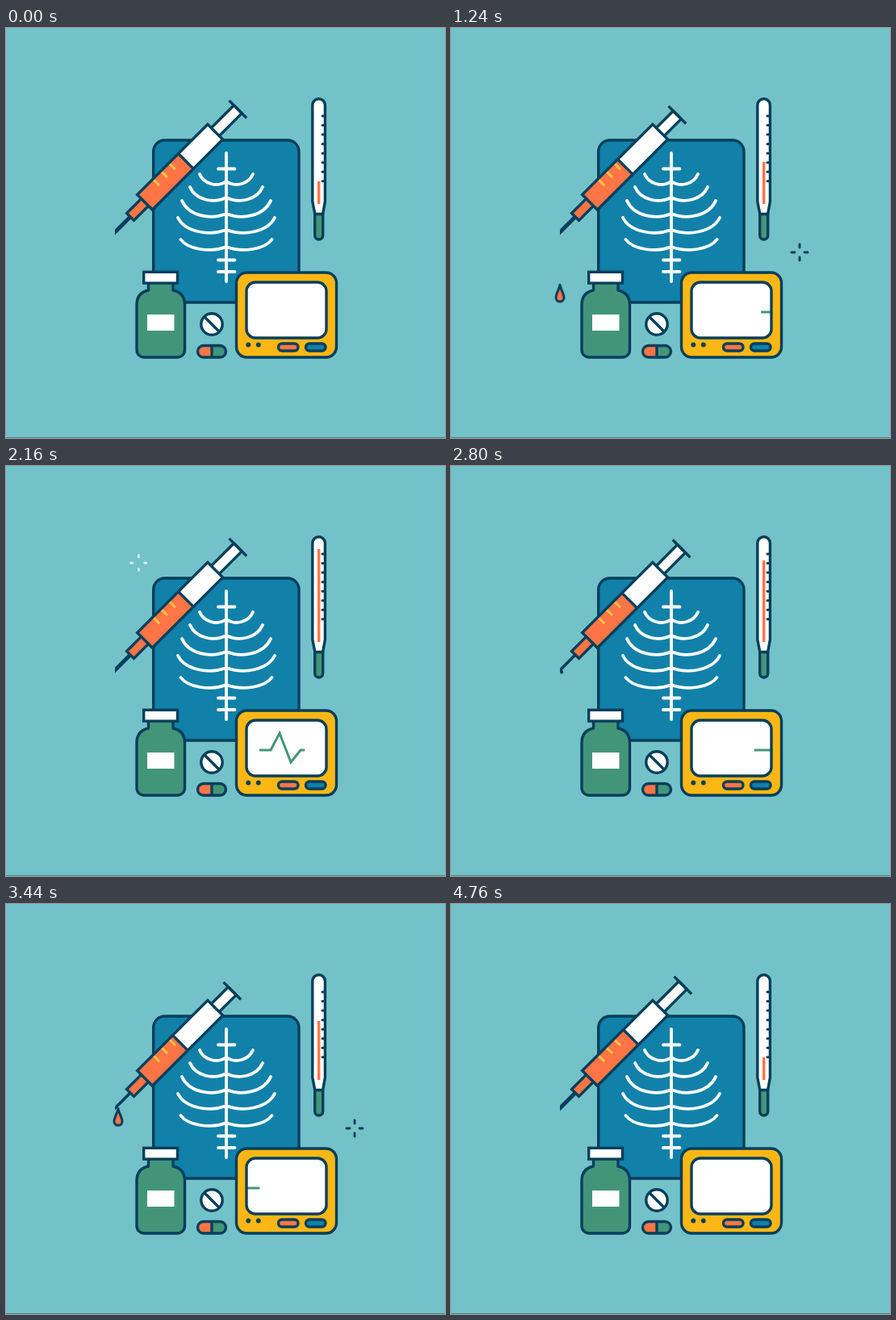
Write an HTML page that moves like this. It is 544 px wide and 508 px high and loops after 4800 ms.

```html
<!DOCTYPE html>
<html lang="en">
<head>
<meta charset="utf-8">
<title>Medical kit</title>
<style>
  html, body { margin: 0; width: 100%; height: 100%; overflow: hidden; background: #73c2c9; }
  svg { display: block; width: 100vw; height: 100vh; }
  .ink { stroke: #063f5b; stroke-width: 3.4; stroke-linejoin: round; }
  .line { fill: none; stroke-linecap: round; }
</style>
</head>
<body>
<svg viewBox="0 0 544 508">
  <defs>
    <clipPath id="screenClip"><rect x="298" y="315" width="99" height="69" rx="11"/></clipPath>
    <clipPath id="tipClip"><rect x="135" y="220" width="40" height="40"/></clipPath>
  </defs>
  <rect width="544" height="508" fill="#73c2c9"/>
  <rect y="507" width="544" height="1" fill="#4f8086"/>

  <!-- x-ray -->
  <rect class="ink" x="182.7" y="139" width="180.3" height="201" rx="14" fill="#1181a9"/>
  <path id="ribs" class="line" stroke="#fff" stroke-width="3.8"/>

  <!-- thermometer -->
  <path class="ink" fill="#43957a" d="M382.7 230H392.7V257a5 5 0 0 1-10 0Z"/>
  <path class="ink" fill="#fff" d="M379.8 95.5a7.8 7.8 0 0 1 15.6 0V215L392.6 230.5H382.8L379.8 215Z"/>
  <path id="ticks" class="line" stroke="#063f5b" stroke-width="3"/>
  <path id="mercury" stroke="#ff7545" stroke-width="3.4"/>

  <!-- bottle -->
  <path class="ink" fill="#43957a" d="M176.5 315H207V325Q221.5 328 221.5 343V399a9 9 0 0 1-9 9H171a9 9 0 0 1-9-9V343Q162 328 176.5 325Z"/>
  <rect class="ink" x="170.7" y="302.3" width="41.8" height="13.8" fill="#fff" style="stroke-linejoin:miter"/>
  <rect x="175" y="355" width="33.5" height="20" fill="#fff"/>

  <!-- pills -->
  <circle class="ink" cx="255" cy="367" r="13.2" fill="#fff"/>
  <path class="ink" d="M246 358L264 376"/>
  <rect x="237.5" y="393.5" width="35" height="14.5" rx="7.2" fill="#43957a"/>
  <path fill="#ff7545" d="M255 393.5H244.7a7.2 7.2 0 0 0 0 14.5H255Z"/>
  <path class="ink" d="M255 393.5V408"/>
  <rect class="ink" x="237.5" y="393.5" width="35" height="14.5" rx="7.2" fill="none"/>

  <!-- monitor -->
  <rect class="ink" x="285.5" y="303" width="124" height="105" rx="13" fill="#fdb714"/>
  <rect x="298" y="315" width="99" height="69" rx="11" fill="#fff"/>
  <g clip-path="url(#screenClip)">
    <path id="pulse" fill="none" stroke="#43957a" stroke-width="3" d="M299 352H328L339 331L353 367L365 352H397"/>
  </g>
  <rect class="ink" x="298" y="315" width="99" height="69" rx="11" fill="none"/>
  <circle cx="300.3" cy="392.5" r="2.9" fill="#063f5b"/>
  <circle cx="312.8" cy="392.5" r="2.9" fill="#063f5b"/>
  <rect class="ink" x="337.5" y="391" width="24.5" height="9" rx="4.5" fill="#ff7545"/>
  <rect class="ink" x="371.5" y="391" width="24.5" height="9" rx="4.5" fill="#1181a9"/>

  <!-- syringe -->
  <g clip-path="url(#tipClip)"><path id="needle" stroke="#063f5b" d="M132 256L156 232"/></g>
  <g transform="translate(136 252) rotate(-45)">
    <g id="plunger">
      <rect class="ink" x="160" y="-7" width="54" height="14" fill="#fff"/>
      <path class="ink" d="M214 -15.3V15.3"/>
    </g>
    <rect class="ink" x="25.5" y="-6.3" width="26" height="12.6" fill="#ff7545" style="stroke-linejoin:miter"/>
    <rect x="51" y="-13.2" width="123.3" height="26.4" fill="#fff"/>
    <rect id="liquid" x="51" y="-13.2" height="26.4" fill="#ff7545"/>
    <path id="edge" class="ink" d="M0 -13.2V13.2"/>
    <path stroke="#ffc247" stroke-width="3" d="M78.5 -12V-2M92.5 -12V-2M106.5 -12V-2"/>
    <rect class="ink" x="51" y="-13.2" width="123.3" height="26.4" fill="none" style="stroke-linejoin:miter"/>
  </g>

  <path id="drop" class="ink" fill="#ff7545" vector-effect="non-scaling-stroke"
    d="M0 0C1 6 5 11 5 15.8A5 5 0 0 1-5 15.8C-5 11-1 6 0 0Z"/>
  <path id="darkSpark" class="line" stroke="#063f5b" stroke-width="2.9"/>
  <path id="lightSpark" class="line" stroke="#fff" stroke-width="2.5"/>
</svg>
<script>
const LOOP = 4800, HALF = 2400;
const el = id => document.getElementById(id);
const set = (id, name, value) => el(id).setAttribute(name, value);
const show = (id, on) => { el(id).style.display = on ? '' : 'none'; };

// Smooth monotone curve through [time, value] keys.
function curve(keys, t) {
  const n = keys.length - 1;
  if (t <= keys[0][0]) return keys[0][1];
  if (t >= keys[n][0]) return keys[n][1];
  let i = 0;
  while (t > keys[i + 1][0]) i++;
  const slope = k => (keys[k + 1][1] - keys[k][1]) / (keys[k + 1][0] - keys[k][0]);
  const tangent = k => {
    if (k === 0 || k === n) return 0;
    const a = slope(k - 1), b = slope(k);
    return a * b <= 0 ? 0 : 2 * a * b / (a + b);
  };
  const [t0, v0] = keys[i], [t1, v1] = keys[i + 1];
  const d = t1 - t0, p = (t - t0) / d, q = 1 - p;
  return v0 * (1 + 2 * p) * q * q + v1 * p * p * (3 - 2 * p)
    + d * p * q * (tangent(i) * q - tangent(i + 1) * p);
}

const HEAT = [[0, 190], [720, 184], [1240, 166], [2160, 103], [2360, 101],
  [2800, 117], [3440, 145], [4640, 190]];
const PUSH = [[0, 0], [400, 1.7], [720, 5], [1040, 7], [1300, 7], [1680, 4], [2160, 0]];
const DROP_SIZE = [[340, 0], [400, .22], [720, .67], [980, 1], [1330, 1], [1620, 0]];
const DROP_X = [[340, 137], [720, 138.4], [1040, 139], [1240, 135], [1620, 134.5]];
const DROP_Y = [[340, 252], [720, 251.5], [1040, 253.5], [1240, 318], [1440, 374], [1620, 393]];
const BEATS = [[0, 1310], [1463, 1467], [3352, 1400]];
const DASH = 101, TRACE = el('pulse').getTotalLength();

function drawStill() {
  const ribs = [[33, 181, 194], [45, 197, 214], [55, 214, 234], [60, 235, 254], [56.5, 262, 275]];
  let d = 'M273 155V314M263 174.5H283.5M263 287.5H283.5M263 302H283.5';
  for (const [w, y, base] of ribs)
    for (const s of [-1, 1]) {
      const x = k => 273 + s * w * k;
      d += `M${x(1)} ${y}C${x(.85)} ${base - 1} ${x(.35)} ${base + 4} 273 ${base - 4}`;
    }
  set('ribs', 'd', d);
  let marks = '';
  for (let i = 0; i < 8; i++) marks += `M392 ${109 + i * 11.55}H394.5`;
  set('ticks', 'd', marks);
}

function spark(id, x, y, size, p) {
  const on = p > 0 && p < 1;
  show(id, on);
  if (!on) return;
  const far = size * (1 - (1 - p) ** 3), near = Math.min(far, size * p ** 1.15);
  let d = '';
  for (const [u, v] of [[1, 0], [-1, 0], [0, 1], [0, -1]])
    d += `M${x + u * near} ${y + v * near}L${x + u * far} ${y + v * far}`;
  set(id, 'd', d);
}

function drawPulse(t) {
  const beat = BEATS.find(([start, dur]) => t > start && t < start + dur);
  let head = 0;
  if (beat) head = (t - beat[0]) / beat[1] * (TRACE + DASH);
  const from = Math.max(0, head - DASH), to = Math.min(TRACE, head);
  show('pulse', to > from);
  set('pulse', 'stroke-dasharray', `0 ${from} ${Math.max(0, to - from)} 999`);
}

function draw(t) {
  const h = t % HALF;
  set('mercury', 'd', `M387.7 ${curve(HEAT, t)}V218`);

  const push = curve(PUSH, h) * Math.SQRT2, level = 123 - push;
  set('plunger', 'transform', `translate(${-push} 0)`);
  set('liquid', 'width', level - 51);
  set('edge', 'transform', `translate(${level} 0)`);

  const size = curve(DROP_SIZE, h);
  show('drop', size > .01);
  set('drop', 'transform', `translate(${curve(DROP_X, h)} ${curve(DROP_Y, h)}) scale(${size})`);
  el('drop').style.strokeWidth = Math.min(3, 1.5 + size * 2);
  set('needle', 'stroke-width', h > 340 && h < 1080 ? 3.6 : 5);

  drawPulse(t);
  spark('darkSpark', 432, 278, 10.6, (t - (t < HALF ? 860 : 3060)) / 620);
  spark('lightSpark', 164.3, 120, 9.5, (t - 1700) / 580);
}

drawStill();
const begin = performance.now();
function tick() {
  draw((performance.now() - begin) % LOOP);
  requestAnimationFrame(tick);
}
tick();
</script>
</body>
</html>
```
